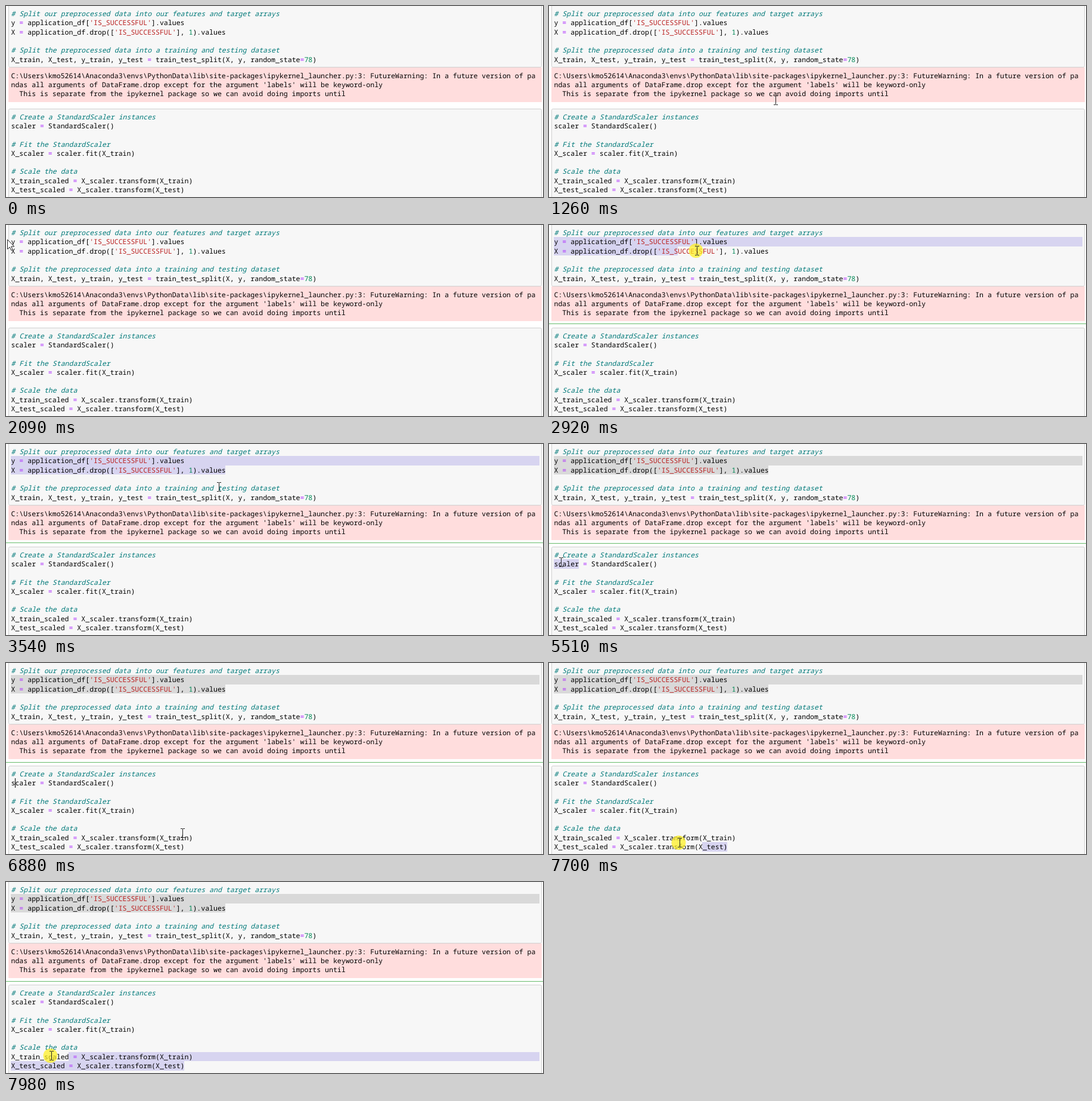
Write an HTML page that moves like this. It is 901x320 px and loops after 8 s.

```html
<!DOCTYPE html>
<html lang="en">
<head>
<meta charset="utf-8">
<title>Notebook cells</title>
<style>
  html, body { margin: 0; width: 100%; height: 100%; overflow: hidden; background: #fff; }
  svg { display: block; width: 901px; height: 320px; }
  text {
    font: 11.55px "Noto Sans Mono", "DejaVu Sans Mono", monospace;
    white-space: pre;
    text-rendering: geometricPrecision;
    font-variant-ligatures: none;
  }
  .comment { fill: #007979; font-style: italic; }
  .string { fill: #ba2121; }
  .number { fill: #008855; }
  .operator { fill: #aa22ff; }
  .cell { fill: #f7f7f7; stroke: #cfcfcf; }
  .crisp { shape-rendering: crispEdges; }
</style>
</head>
<body>
<svg id="stage" viewBox="0 0 901 320">
  <rect class="cell" x="4.5" y="-9.5" width="894" height="112" rx="2"/>
  <rect x="4" y="103" width="895" height="58" fill="#ffdddd"/>
  <rect class="cell" x="4.5" y="172.5" width="894" height="170" rx="2"/>
  <rect id="selA" class="crisp"/>
  <rect id="selB" class="crisp"/>
  <rect id="selC" class="crisp"/>
  <rect id="selD" class="crisp"/>
  <g id="lines"></g>
  <rect id="edge" class="crisp" width="901" height="1" fill="#66bb6a"/>
  <rect id="caret" class="crisp" width="1" height="15.3"/>
  <circle id="press" r="12" fill="#fff01e" fill-opacity=".72"/>
  <path id="beam" d="M-3.5-7.5H-1Q0-7.5 0-6.5Q0-7.5 1-7.5H3.5M0-7V7M-3.5 7.5H-1Q0 7.5 0 6.5Q0 7.5 1 7.5H3.5"
        fill="none" stroke="#222"/>
  <path id="arrow" d="M.5.5V16.5L4.2 13L6.8 18.5L9.2 17.5L6.7 12H11.8Z" fill="#fff" stroke="#222"/>
</svg>
<script>
const LOOP = 8000, STEP = 68.5, START = 990;
const LEFT = 8, CHAR = 6.93, ROW = 15.3, RIGHT = 895;
const topA = 5, topB = 177.9;
const FOCUSED = "#d7d4f0", BLURRED = "#d9d9d9";
const $ = id => document.getElementById(id);

const cellA = [
  "# Split our preprocessed data into our features and target arrays",
  "y = application_df['IS_SUCCESSFUL'].values",
  "X = application_df.drop(['IS_SUCCESSFUL'], 1).values",
  "",
  "# Split the preprocessed data into a training and testing dataset",
  "X_train, X_test, y_train, y_test = train_test_split(X, y, random_state=78)"
];
const cellB = [
  "# Create a StandardScaler instances",
  "scaler = StandardScaler()",
  "",
  "# Fit the StandardScaler",
  "X_scaler = scaler.fit(X_train)",
  "",
  "# Scale the data",
  "X_train_scaled = X_scaler.transform(X_train)",
  "X_test_scaled = X_scaler.transform(X_test)"
];
const warning = [
  "C:\\Users\\kmo52614\\Anaconda3\\envs\\PythonData\\lib\\site-packages\\ipykernel_launcher.py:3: FutureWarning: In a future version of pa",
  "ndas all arguments of DataFrame.drop except for the argument 'labels' will be keyword-only",
  "  This is separate from the ipykernel package so we can avoid doing imports until"
];

function tokens(line) {
  if (line[0] === "#") return [["comment", line]];
  return line.split(/('[^']*'|=|\b\d+\b)/).filter(Boolean).map(s =>
    [s[0] === "'" ? "string" : s === "=" ? "operator" : /^\d+$/.test(s) ? "number" : "", s]);
}

function addLine(parts, baseline) {
  const ns = "http://www.w3.org/2000/svg";
  const text = document.createElementNS(ns, "text");
  text.setAttribute("x", LEFT + .5);
  text.setAttribute("y", Math.round(baseline));
  for (const [kind, value] of parts) {
    const span = document.createElementNS(ns, "tspan");
    if (kind) span.setAttribute("class", kind);
    span.textContent = value;
    text.append(span);
  }
  $("lines").append(text);
}
cellA.forEach((s, i) => addLine(tokens(s), 17 + ROW * i));
cellB.forEach((s, i) => addLine(tokens(s), 189.6 + ROW * i));
warning.forEach((s, i) => addLine([["", s]], 121 + 15 * i));

// Pointer path: time, x, y, easing into that point
const linear = u => u;
const out = u => 1 - (1 - u) ** 2;
const smooth = u => u * u * (3 - 2 * u);
const path = [
  [990, 690, 271], [1750, 28, 30, out], [1820, 24, 30], [2086, 2, 24, out],
  [2160, 3, 25], [2290, 9, 29], [2510, 9, 29],
  [2839, 216, 40], [2907, 247, 43], [3113, 372, 44, out], [3400, 372, 44],
  [3930, 263, 246, smooth], [4200, 263, 246], [4910, 20, 198, smooth], [5950, 20, 198],
  [6390, 193, 212, smooth], [6590, 193, 212], [6880, 296, 285], [7160, 309, 301, out],
  [7340, 309, 301], [7400, 306, 305], [7550, 305, 308],
  [7906, 106, 292], [7975, 76, 291]
];

function pointer(t) {
  const i = path.findIndex(k => k[0] > t);
  if (i < 0) return path[path.length - 1].slice(1, 3);
  if (i === 0) return path[0].slice(1, 3);
  const [t0, x0, y0] = path[i - 1], [t1, x1, y1, ease = linear] = path[i];
  const u = ease((t - t0) / (t1 - t0));
  return [x0 + (x1 - x0) * u, y0 + (y1 - y0) * u];
}

const presses = [[2510, 3200], [3940, 4090], [4980, 5110], [5180, 5510], [5640, 5770], [7430, LOOP]];
// Caret: from, to, column, row, start of blinking
const carets = [
  [3940, 4980, 30, 4, 3950], [4980, 5180, 1, 1, 4980],
  [5640, 7430, 1, 1, 5550], [7430, 7570, 42, 8, 7430]
];

function set(id, attrs) {
  for (const name in attrs) $(id).setAttribute(name, attrs[name]);
}
function show(id, on) {
  $(id).style.display = on ? "" : "none";
}
function mark(id, x0, x1, y, fill = FOCUSED) {
  show(id, true);
  set(id, { x: x0, width: Math.max(0, x1 - x0), y, height: ROW, fill });
}
const columnX = col => LEFT + CHAR * col;
function snap(x, line) {
  const col = Math.round((x - LEFT) / CHAR);
  return columnX(Math.min(line.length, Math.max(0, col)));
}

// The selection follows the pointer one step late
function drawSelections(t, q) {
  const [x, y] = pointer(q - STEP);
  ["selA", "selB", "selC", "selD"].forEach(id => show(id, false));
  if (t >= 2510) {
    const y1 = topA + ROW, y2 = y1 + ROW;
    const color = t < 3940 ? FOCUSED : BLURRED;
    if (t < 3200 && y < y2) {
      mark("selA", LEFT, snap(x, cellA[1]), y1);
    } else {
      mark("selA", LEFT, RIGHT, y1, color);
      mark("selB", LEFT, t < 3200 ? snap(x, cellA[2]) : columnX(cellA[2].length), y2, color);
    }
  }
  if (t >= 5180 && t < 5640) mark("selC", LEFT, columnX(6), topB + ROW);
  if (t >= 7570) {
    const y1 = topB + ROW * 7, y2 = y1 + ROW, above = y < y2;
    mark("selC", above ? LEFT : snap(x, cellB[8]), columnX(cellB[8].length), y2);
    if (above) mark("selD", snap(x, cellB[7]), RIGHT, y1);
  }
}

function draw(t) {
  const q = t < START ? t : START + Math.floor((t - START) / STEP + .03) * STEP;
  const [x, y] = pointer(q).map(Math.round);
  const visible = t >= START, outside = x < 5;

  drawSelections(t, q);

  show("edge", t >= 2510);
  set("edge", { y: t < 3940 ? 165 : 166 });

  const caret = carets.find(c => t >= c[0] && t < c[1]);
  show("caret", caret && Math.floor((t - caret[4]) / 530) % 2 === 0);
  if (caret) set("caret", { x: Math.round(columnX(caret[2])), y: topB + ROW * caret[3] });

  show("press", presses.some(([a, b]) => t >= a && t < b));
  set("press", { cx: x - 1.5, cy: y });
  show("beam", visible && !outside);
  set("beam", { transform: `translate(${x + .5} ${y})` });
  show("arrow", visible && outside);
  set("arrow", { transform: `translate(${x} ${y})` });
}

function tick() {
  draw(performance.now() % LOOP);
  requestAnimationFrame(tick);
}
tick();
</script>
</body>
</html>
```
